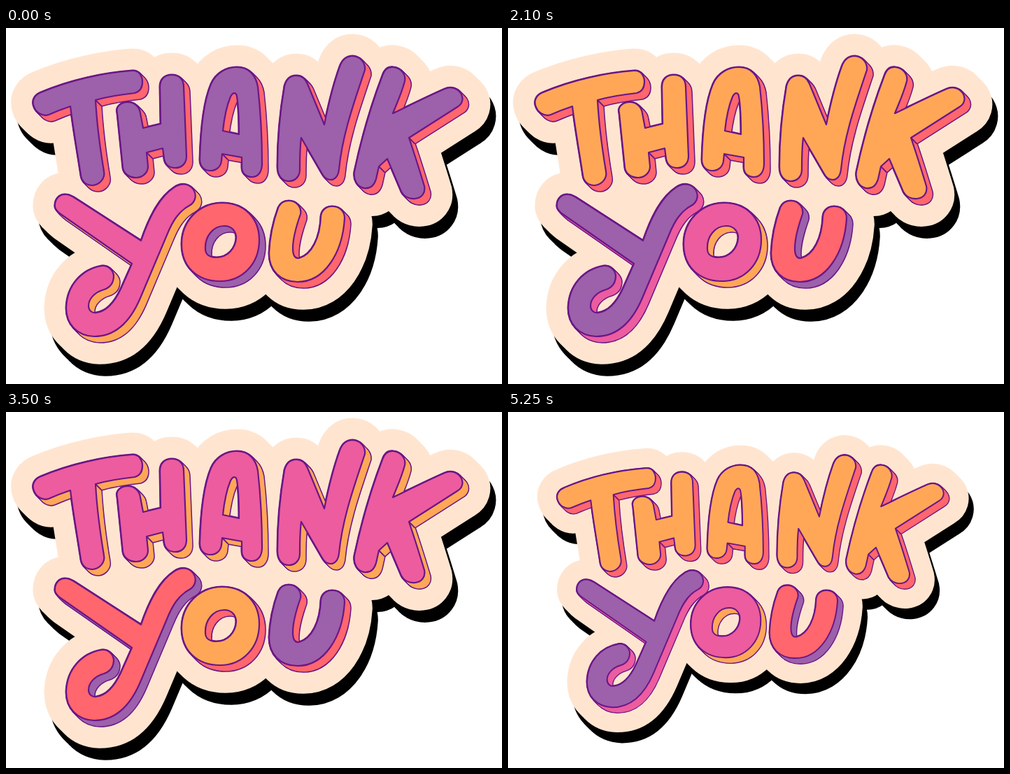
An HTML page that plays this animation: 709x509 px, repeating every 5600 ms.

```html
<!DOCTYPE html>
<html lang="en">
<head>
<meta charset="utf-8">
<title>Thank you sticker</title>
<style>
html, body { margin: 0; width: 100%; height: 100%; overflow: hidden; background: #fff; }
svg { display: block; width: 709px; height: 509px; }
</style>
</head>
<body>
<svg viewBox="0 0 709 509" role="img" aria-label="Thank you">
  <defs id="defs"></defs>
  <g id="sticker" stroke-linejoin="round" stroke-linecap="round" fill-rule="evenodd"></g>
</svg>
<script>
const STEP = 350, LOOP = 5600, DEPTH = 8.3, SLICES = 12;
const INK = '#6a1688', PAPER = '#ffe5d0';
const PURPLE = '#9d60aa', PINK = '#ec5c9f', RED = '#ff666d', ORANGE = '#ffa757';

// [front, side] pairs for each colour step
const bigWord = [[PURPLE, RED], [PINK, ORANGE], [RED, PURPLE], [ORANGE, RED]];
const why = [[PINK, ORANGE], [RED, PURPLE], [ORANGE, RED], [PURPLE, PINK]];
const oh = [[RED, PURPLE], [ORANGE, RED], [PURPLE, PINK], [PINK, ORANGE]];
const you = [[ORANGE, RED], [PURPLE, RED], [PINK, ORANGE], [RED, PURPLE]];

const letters = [
  { id: 'T', tones: bigWord, corners: [[128, 103]],
    d: 'M50 92C92 74 140 64 180 61C191 60 195 70 195 77C195 85 191 91 184 93C165 95 146 98 128 103C130 140 135 175 140 205C142 215 134 224 124 225C114 225 108 219 107 211C102 178 96 145 92 112C80 116 70 120 61 124C52 127 42 121 39 110C37 102 42 95 50 92Z' },
  { id: 'H', tones: bigWord, corners: [[201, 178]],
    d: 'M159 122C156 112 165 106 174 106C184 106 191 113 192 122L196 143L221 137L220 84C220 73 227 67 237 67C247 67 254 73 254 84L258 183C258 194 251 200 242 200C233 200 227 195 226 187L224 172L201 178L203 198C203 207 195 214 186 214C176 214 168 208 167 200Z' },
  { id: 'A', tones: bigWord, corners: [[309, 180]],
    d: 'M277 188C278 150 281 108 293 80C300 64 315 56 330 56C347 56 357 67 360 84C364 120 366 160 366 194C366 206 360 213 352 213C343 213 337 208 337 199L337 185L309 180L308 190C307 199 300 204 292 204C283 204 277 198 277 188ZM310 147C312 128 316 110 321 98C325 91 329 92 330 98C333 115 333 135 333 152Z' },
  { id: 'N', tones: bigWord, corners: [],
    d: 'M388 198C388 160 392 118 398 83C401 72 408 68 415 68C423 68 428 73 431 80L455 138C461 108 468 80 477 55C481 44 488 40 496 40C507 41 514 50 513 60C497 108 481 152 476 202C475 212 470 217 464 217C458 217 454 213 451 207L422 157C420 172 420 186 420 202C420 213 413 219 404 219C395 219 388 212 388 198Z' },
  { id: 'K', tones: bigWord, corners: [[576, 157], [533, 198]],
    d: 'M498 205C508 158 522 110 538 68C541 59 547 55 554 56C564 57 572 66 570 76C566 92 559 107 553 122C578 110 602 98 627 87C636 83 645 86 650 93C655 101 652 109 645 113L576 157C584 180 591 203 598 226C600 236 594 243 585 244C575 245 568 240 565 234L545 187L533 198L529 216C526 226 520 230 512 229C502 227 496 217 498 205Z' },
  { id: 'Y', tones: why, corners: [],
    d: 'M70 256C69 245 76 237 86 238C90 238 93 240 97 242L193 304C203 275 217 243 240 228C251 220 262 223 268 231C273 239 271 249 262 254C247 262 238 276 230 296L192 386C178 419 158 441 126 441C101 440 86 423 86 400C87 368 108 345 137 340C146 339 153 346 154 354C154 364 149 371 140 374C126 378 118 388 118 397C118 404 123 408 129 407C145 405 156 390 164 373L180 337L78 266C74 263 71 260 70 256Z' },
  { id: 'O', tones: oh, corners: [],
    d: 'M251 309C251 275 277 250 309 250C341 250 362 272 362 303C362 337 338 362 306 362C273 362 251 341 251 309ZM285 316C284 298 296 283 312 283C324 283 329 292 329 300C328 316 316 328 301 328C290 328 285 323 285 316Z' },
  { id: 'U', tones: you, corners: [],
    d: 'M376 322C377 298 382 276 389 257C392 250 398 247 404 247C415 247 423 256 421 266C415 283 410 299 410 315C410 325 413 330 419 329C437 324 449 300 450 269C451 260 458 255 466 255C477 255 484 262 484 272C481 322 455 363 417 363C392 363 376 347 376 322Z' }
];

const defs = document.getElementById('defs');
const sticker = document.getElementById('sticker');

function add(parent, tag, attrs) {
  const el = document.createElementNS('http://www.w3.org/2000/svg', tag);
  for (const key in attrs) el.setAttribute(key, attrs[key]);
  return parent.appendChild(el);
}

// Copies of a letter swept along the depth diagonal
function sweep(parent, id, slices, attrs) {
  const g = add(parent, 'g', attrs);
  for (let i = 0; i <= slices; i++) {
    const shift = DEPTH * i / slices;
    add(g, 'use', { href: '#' + id, x: shift, y: shift });
  }
  return g;
}

for (const { id, d } of letters) add(defs, 'path', { id, d });

// Paper shape: thickened letters plus a patch closing the gap between the words
const backing = add(defs, 'g', { id: 'backing', 'stroke-width': 63, 'fill-rule': 'nonzero' });
for (const { id } of letters) sweep(backing, id, 2, {});
add(backing, 'path', { d: 'M150 220H300L200 290Z' });
add(sticker, 'use', { href: '#backing', x: 8, y: 17, fill: '#000', stroke: '#000' });
add(sticker, 'use', { href: '#backing', fill: PAPER, stroke: PAPER });

for (const letter of letters) {
  const { id, corners } = letter;
  sweep(sticker, id, SLICES, { fill: INK, stroke: INK, 'stroke-width': 3 });
  letter.side = sweep(sticker, id, SLICES, {});
  for (const [x, y] of corners) {
    add(sticker, 'path', { d: `M${x} ${y}l${DEPTH} ${DEPTH}`, stroke: INK, 'stroke-width': 1.8 });
  }
  letter.front = add(sticker, 'use', { href: '#' + id, stroke: INK, 'stroke-width': 2.2 });
}

let shown = -1;

function render(time) {
  const step = Math.floor((time % LOOP) / STEP);
  if (step === shown) return;
  shown = step;
  const tone = Math.floor(step / 2) % 4;
  const scale = step % 2 ? 0.9 : 1;
  sticker.setAttribute('transform', `translate(354.5 254) scale(${scale}) translate(-354.5 -254)`);
  for (const { tones, front, side } of letters) {
    front.setAttribute('fill', tones[tone][0]);
    side.setAttribute('fill', tones[tone][1]);
  }
}

const start = performance.now();
function tick() {
  render(performance.now() - start);
  requestAnimationFrame(tick);
}
tick();
</script>
</body>
</html>
```
